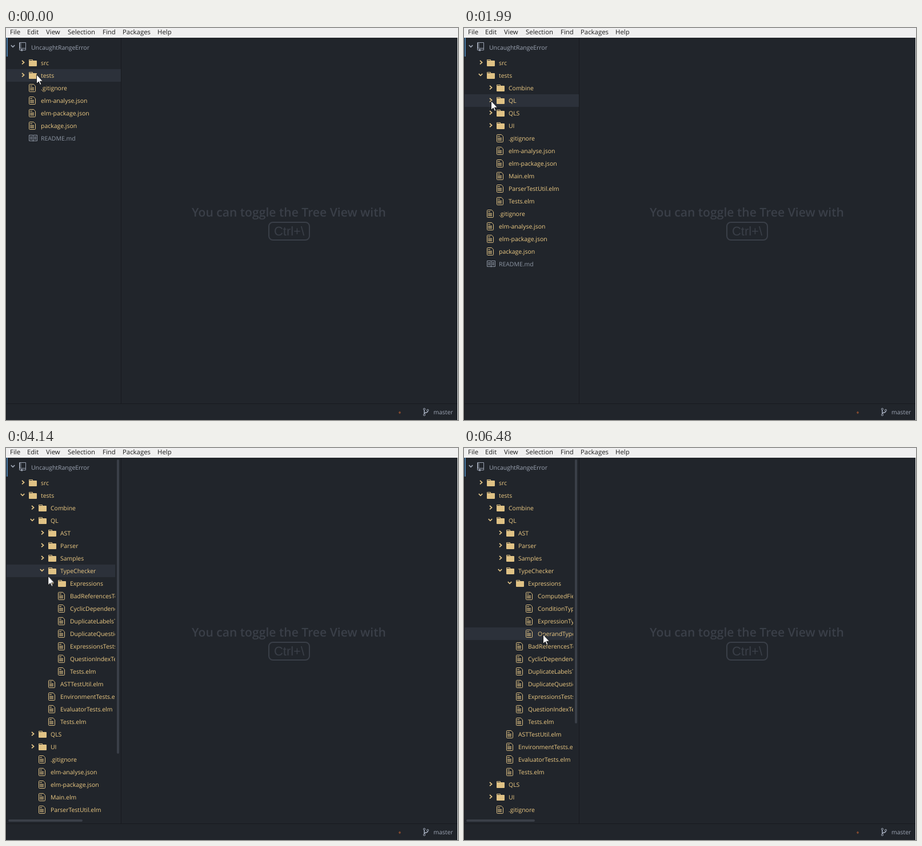
An HTML page that plays this animation: 791 by 686 pixels, repeating every 8 s.

```html
<!DOCTYPE html>
<html lang="en">
<head>
<meta charset="utf-8">
<title>Tree view</title>
<style>
html, body { margin: 0; width: 100%; height: 100%; overflow: hidden; background: #21252b; }
svg { display: block; }
text { font: 10.45px "Open Sans", "Noto Sans", sans-serif; text-rendering: geometricPrecision; white-space: pre; }
.menu { font-size: 11.4px; fill: #1c1c1c; }
.plain { fill: #9da5b4; color: #9da5b4; }
.dim { fill: #8d96a4; color: #8d96a4; }
.changed { fill: #eecb84; color: #e0c285; }
.line { fill: none; stroke: currentColor; }
.solid { fill: currentColor; stroke: none; }
.arrow { fill: none; stroke: currentColor; stroke-width: 1.7; }
.thumb { fill: #3a3f48; }
.hint { font-size: 21.1px; font-weight: 600; fill: #3a3f48; text-anchor: middle; }
.key { font: 22px "Liberation Sans", Arial, sans-serif; fill: #3a3f48; text-anchor: middle; }

.tree, #mark, #tip, #pointer { animation: 8s step-end infinite; }
.tree { visibility: hidden; }
#tree0 { animation-name: tree0; }
#tree1 { animation-name: tree1; }
#tree2 { animation-name: tree2; }
#tree3 { animation-name: tree3; }
#tree4 { animation-name: tree4; }
@keyframes tree0 { 0% { visibility: visible } 9.45%, 100% { visibility: hidden } }
@keyframes tree1 { 0% { visibility: hidden } 9.45% { visibility: visible } 25.82%, 100% { visibility: hidden } }
@keyframes tree2 { 0% { visibility: hidden } 25.82% { visibility: visible } 45.95%, 100% { visibility: hidden } }
@keyframes tree3 { 0% { visibility: hidden } 45.95% { visibility: visible } 59.45%, 100% { visibility: hidden } }
@keyframes tree4 { 0% { visibility: hidden } 59.45%, 100% { visibility: visible } }

#mark { animation-name: mark; }
@keyframes mark {
  0% { transform: translateY(72px); width: 200px }
  24.82% { transform: translateY(116px); width: 200px }
  44.95% { transform: translateY(204px); width: 200px }
  45.95% { transform: translateY(204px); width: 190px }
  58.57% { transform: translateY(226px); width: 190px }
  80.95%, 100% { transform: translateY(314px); width: 190px }
}

#tip { animation-name: tip; opacity: 0; }
@keyframes tip {
  0% { opacity: 0 }
  76.95% { opacity: .35 }
  77.95% { opacity: .75 }
  78.95% { opacity: 1 }
  79.95%, 100% { opacity: 0 }
}

#pointer { animation-name: pointer; }
@keyframes pointer {
  0% { transform: translate(53px, 81px) }
  .83% { transform: translate(53px, 81px); animation-timing-function: steps(5, start) }
  5.66% { transform: translate(31px, 81px) }
  12.32% { transform: translate(31px, 81px); animation-timing-function: steps(3, start) }
  15.2% { transform: translate(34px, 90px); animation-timing-function: steps(3, start) }
  18.08% { transform: translate(43px, 118px); animation-timing-function: steps(3, start) }
  20.95% { transform: translate(47px, 130px) }
  22.95% { transform: translate(47px, 130px); animation-timing-function: steps(2, start) }
  24.82% { transform: translate(47px, 127px) }
  27.7% { transform: translate(47px, 127px); animation-timing-function: steps(3, start) }
  30.58% { transform: translate(49px, 136px); animation-timing-function: steps(5, start) }
  35.38% { transform: translate(58px, 186px); animation-timing-function: steps(3, start) }
  38.3% { transform: translate(62px, 206px); animation-timing-function: steps(2, start) }
  40.2% { transform: translate(62px, 210px) }
  48.82% { transform: translate(62px, 210px); animation-timing-function: steps(5, start) }
  53.64% { transform: translate(76px, 227px) }
  56.57% { transform: translate(76px, 227px); animation-timing-function: steps(2, start) }
  58.5% { transform: translate(80px, 231px) }
  60.45% { transform: translate(80px, 231px); animation-timing-function: steps(7, start) }
  67.07% { transform: translate(117px, 287px); animation-timing-function: steps(5, start) }
  71.9% { transform: translate(136px, 326px) }
  79.95%, 100% { transform: translate(138px, 326px) }
}
</style>
</head>
<body>
<svg width="791" height="686" viewBox="0 0 791 686">
  <defs>
    <path id="folder" class="solid" d="M13 4H7V3q0-1-1-1H1Q0 2 0 3v10q0 1 1 1h12q1 0 1-1V5q0-1-1-1zM6 4H1V3h5z"/>
    <path id="file" class="line" d="M1.5 1.5h6.8l3.2 3.2v8.8q0 1-1 1h-9q-1 0-1-1v-11q0-1 1-1zM2 4.5h4M2 7.5h7M2 9.5h7M2 11.5h7"/>
    <path id="book" class="line" d="M1.5 2.5H8l.5.5.5-.5h6.5v10H9l-.5.8-.5-.8H1.5zM8.5 3v10M3 5.5h4M3 7.5h4M3 9.5h4M10 5.5h4M10 7.5h4M10 9.5h4"/>
    <path id="shut" class="arrow" d="M-2-4 1.6-.8-2 2.4"/>
    <path id="open" class="arrow" d="M-4.2-2.8-1 .4 2.2-2.8"/>
    <clipPath id="wide"><rect x="1" y="17" width="200" height="630"/></clipPath>
    <clipPath id="narrow"><rect x="1" y="17" width="190" height="630"/></clipPath>
  </defs>

  <rect width="791" height="686" fill="#21252b"/>
  <rect id="mark" x="1" width="200" height="22" fill="#2c313a"/>
  <path fill="#181a1f" d="M201 17h1v640h-1zM0 657h790v1H0zM0 17h1v669H0z"/>
  <rect x="1" y="17" width="2" height="33" fill="#4a7ba6"/>
  <rect width="791" height="17" fill="#f0f0f0"/>
  <rect x="790" width="1" height="686" fill="#f4f4f4"/>
  <g id="menu"></g>

  <g class="plain">
    <use href="#open" x="13" y="33"/>
    <g transform="translate(23 25)">
      <path class="line" d="M3 13.5H.5V.5h11v13H6M1 10.5h10M1.5 1v9M3 2.5h1M3 4.5h1M3 6.5h1M3 8.5h1"/>
      <path class="solid" d="M3 12h3v4l-1.5-1.5L3 16z"/>
    </g>
    <text x="44" y="38">UncaughtRangeError</text>
  </g>
  <g id="trees"></g>

  <text class="hint" x="495" y="330">You can toggle the Tree View with</text>
  <rect x="460" y="340" width="71" height="31" rx="7" fill="none" stroke="#3a3f48" stroke-width="2"/>
  <text class="key" x="495.5" y="363">Ctrl+\</text>

  <path fill="#82492f" d="M689 670.5l2.2 2.5-2.2 2.5-2.2-2.5z"/>
  <g class="plain">
    <g class="line" transform="translate(730 664)">
      <circle cx="2" cy="3" r="1.6"/>
      <circle cx="2" cy="13" r="1.6"/>
      <circle cx="8" cy="5" r="1.6"/>
      <path stroke-width="1.6" d="M2 4.6v6.8M2 11.2c0-3.4 6-.6 6-4.6"/>
    </g>
    <text x="748" y="676">master</text>
  </g>

  <g id="tip">
    <rect x="139.5" y="350.5" width="137" height="20" fill="#fff" stroke="#767676"/>
    <text class="menu" x="146" y="364.5" style="fill:#575757">OperandTypeTests.elm</text>
  </g>
  <path id="pointer" fill="#fff" stroke="#111" stroke-width=".9" d="M.5.5v16l3.7-3.6 2.5 5.6 2.2-1-2.4-5.3h5z"/>
</svg>
<script>
const dir = (name, ...kids) => ({ name, kids });
const files = list => list.split(' ').map(name => ({ name }));

const checks = dir('TypeChecker',
  dir('Expressions', ...files('ComputedFieldTypeTests.elm ConditionTypeTests.elm ExpressionTypeTests.elm OperandTypeTests.elm')),
  ...files('BadReferencesTests.elm CyclicDependenciesTests.elm DuplicateLabelsTests.elm DuplicateQuestionsTests.elm ExpressionsTests.elm QuestionIndexTests.elm Tests.elm'));
const lang = dir('QL', dir('AST'), dir('Parser'), dir('Samples'), checks,
  ...files('ASTTestUtil.elm EnvironmentTests.elm EvaluatorTests.elm Tests.elm'));
const root = [
  dir('src'),
  dir('tests', dir('Combine'), lang, dir('QLS'), dir('UI'),
    ...files('.gitignore elm-analyse.json elm-package.json Main.elm ParserTestUtil.elm Tests.elm')),
  ...files('.gitignore elm-analyse.json elm-package.json package.json README.md')
];
const openOrder = ['tests', 'QL', 'TypeChecker', 'Expressions'];

// Scrollbar thumb lengths for each number of opened folders
const thumbs = [{}, {}, { across: 184 }, { across: 130, down: 515 }, { across: 120, down: 462 }];

function rows(items, opened, depth = 0) {
  return items.flatMap(item => {
    const isOpen = opened.includes(item.name);
    return [{ ...item, depth, isOpen }, ...(isOpen ? rows(item.kids, opened, depth + 1) : [])];
  });
}

function drawRow({ name, kids, depth, isOpen }, i) {
  const x = 17 * depth, y = 61 + 22 * i;
  const book = name === 'README.md';
  const icon = kids ? 'folder' : book ? 'book' : 'file';
  const arrow = kids ? `<use href="#${isOpen ? 'open' : 'shut'}" x="${x + 30}" y="${y}"/>` : '';
  return `<g class="${book ? 'dim' : 'changed'}">${arrow}
    <use href="#${icon}" x="${x + (book ? 39 : 40)}" y="${y - 8}"/>
    <text x="${x + 61}" y="${y + 4}">${name}</text></g>`;
}

function drawTree({ across, down }, level) {
  const body = rows(root, openOrder.slice(0, level)).map(drawRow).join('');
  const bars =
    (across ? `<rect class="thumb" x="4" y="650" width="${across}" height="4" rx="2"/>` : '') +
    (down ? `<rect class="thumb" x="194" y="20" width="4" height="${down}" rx="2"/>` : '');
  return `<g class="tree" id="tree${level}"><g clip-path="url(#${down ? 'narrow' : 'wide'})">${body}</g>${bars}</g>`;
}

document.getElementById('trees').innerHTML = thumbs.map(drawTree).join('');

const menu = { File: 7, Edit: 37, View: 70, Selection: 108, Find: 169, Packages: 204, Help: 265 };
document.getElementById('menu').innerHTML = Object.entries(menu)
  .map(([name, x]) => `<text class="menu" x="${x}" y="11">${name}</text>`).join('');
</script>
</body>
</html>
```
